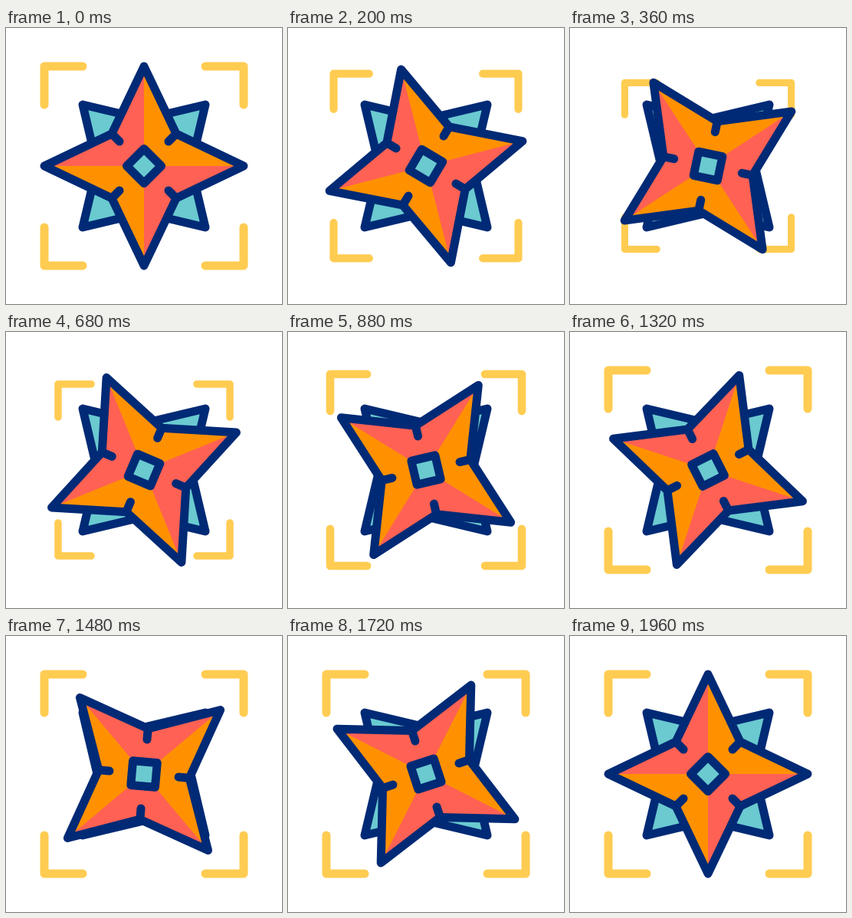
An HTML page for the animation above (2000 ms loop, 360 by 360 pixels).

```html
<!DOCTYPE html>
<html>
<head>
<meta charset="utf-8">
<style>
  html, body { margin: 0; width: 100%; height: 100%; overflow: hidden; background: #fff; }
  svg { display: block; width: 100vw; height: 100vh; }
  path { stroke-width: 11; stroke-linecap: round; stroke-linejoin: round; }
  .line { fill: none; stroke: #002a75; }
  .teal { fill: #6acad0; stroke: #002a75; }
</style>
</head>
<body>
<svg viewBox="-180 -180 360 360">
  <g id="frame" fill="none" stroke="#ffcc52">
    <path d="M-130-80V-130H-80M80-130H130V-80M130 80V130H80M-80 130H-130V80"/>
  </g>
  <path class="teal" d="M-80-80L0-61L80-80L61 0L80 80L0 61L-80 80L-61 0Z"/>
  <g id="star">
    <path fill="#ff9100" d="M0-130L42-42L130 0L42 42L0 130L-42 42L-130 0L-42-42Z"/>
    <path fill="#ff6154" d="M0 0V-130L-42-42L-130 0ZM0 0V130L42 42L130 0Z"/>
    <path class="line" d="M0-130L42-42L130 0L42 42L0 130L-42 42L-130 0L-42-42Z"/>
    <path class="line" d="M-42-42L-32-32M42-42L32-32M42 42L32 32M-42 42L-32 32"/>
    <path class="teal" d="M0-22.5L22.5 0L0 22.5L-22.5 0Z"/>
  </g>
</svg>
<script>
  const LOOP = 2000, STEP = 40;
  const star = document.getElementById('star');
  const frame = document.getElementById('frame');

  // Keys are [step, value, slope]
  const turn = [[0, 0, 0], [12.5, -41, 0], [22, 31.7, 13], [29, 140.3, 15], [37.5, 230.5, 0], [49, 180, 0]];
  const zoom = [[0, 1, 0], [12, 0.805, 0], [26, 1, 0], [49, 1, 0]];

  // Cubic Hermite interpolation between neighbouring keys
  function at(keys, t) {
    const i = Math.max(1, keys.findIndex(k => k[0] >= t));
    const [t0, a, va] = keys[i - 1], [t1, b, vb] = keys[i];
    const h = t1 - t0, u = (t - t0) / h, w = 1 - u;
    return a + (b - a) * u * u * (3 - 2 * u) + h * u * w * (va * w - vb * u);
  }

  function draw() {
    const t = Math.floor(performance.now() % LOOP / STEP);
    star.setAttribute('transform', `rotate(${at(turn, t)})`);
    frame.setAttribute('transform', `scale(${at(zoom, t)})`);
    requestAnimationFrame(draw);
  }
  draw();
</script>
</body>
</html>
```
